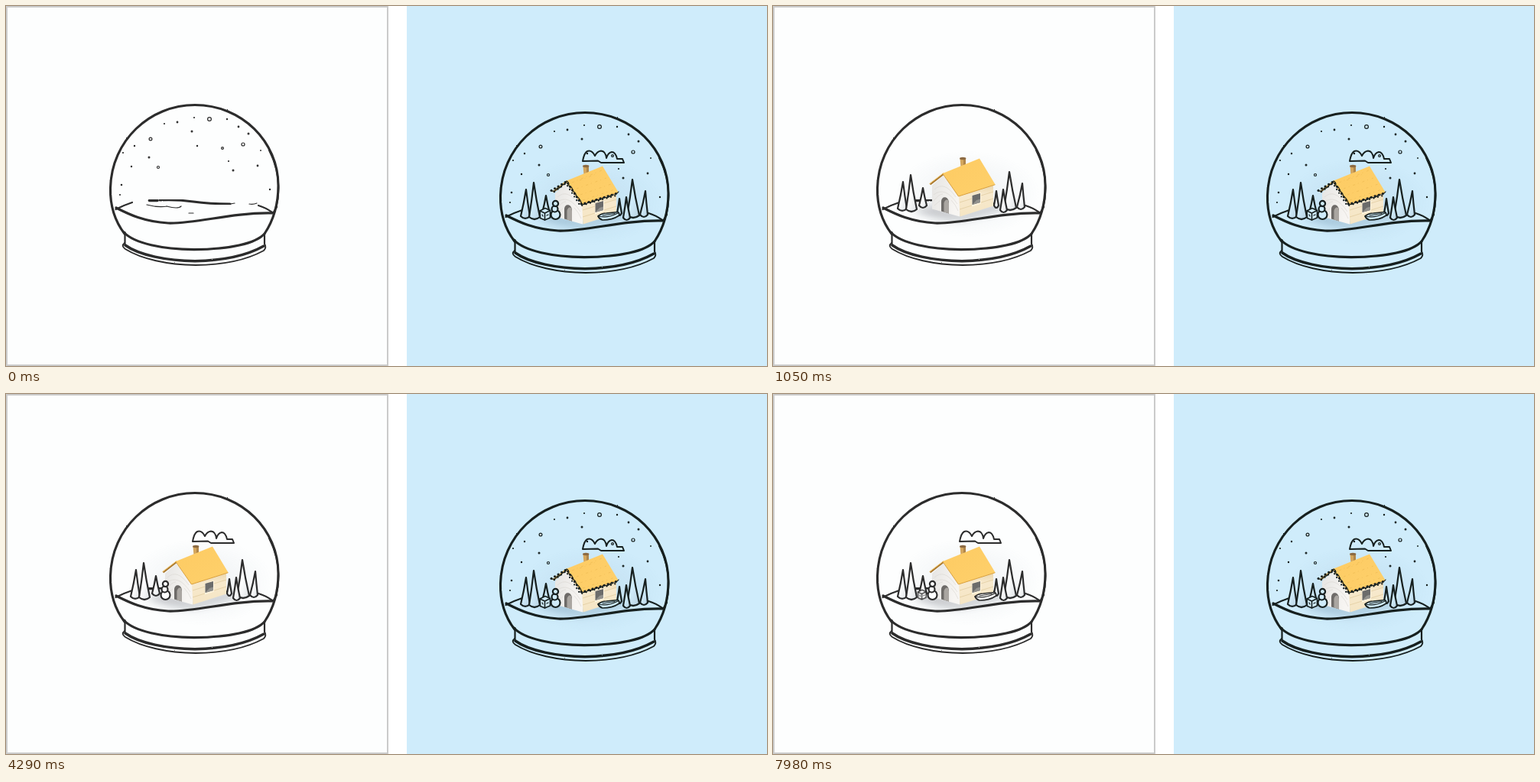
These frames come from a looping animation (995 by 471 pixels, 8 s). An HTML page:

```html
<!DOCTYPE html>
<html lang="en">
<head>
<meta charset="utf-8">
<title>Snow globe</title>
<style>
html, body { margin: 0; width: 100%; height: 100%; overflow: hidden; background: #fff; }
svg { display: block; width: 100vw; height: 100vh; }
.left { --paper: #fdfefe; --ink: #2c2c2c; --shade: #8d9096; }
.right { --paper: #cfebfa; --ink: #17201f; --shade: #7fa3bb; }
.ink { fill: none; stroke: var(--ink); stroke-width: 2.2; stroke-linecap: round; stroke-linejoin: round; }
.solid { fill: var(--paper); }
.thin { stroke-width: 1.2; }

.left use { animation: 8s infinite step-end; }
.left .home { animation-name: home; }
.left .bits { animation-name: bits; }
.left .snow { animation-name: snow; }
.left .pop { animation-timing-function: ease-out; transform-box: fill-box; transform-origin: 50% 60%; }
.left .cloud { animation-name: cloud; }
.left .man { animation-name: man; }
.left .sled { animation-name: sled; }
.left .gift { animation-name: gift; }
@keyframes home { 0% { opacity: 0 } 2.6%, 100% { opacity: 1 } }
@keyframes bits { 0% { opacity: 1 } 2.6%, 100% { opacity: 0 } }
@keyframes snow { 0% { opacity: 1 } 10.5%, 100% { opacity: 0 } }
@keyframes cloud { 0%, 23.6% { transform: scale(0) } 26%, 100% { transform: none } }
@keyframes man { 0%, 33.7% { transform: scale(0) } 36%, 100% { transform: none } }
@keyframes sled { 0%, 58.7% { transform: scale(0) } 61%, 100% { transform: none } }
@keyframes gift { 0%, 97.8% { transform: scale(0) } 99.6%, 100% { transform: scale(.8) } }
</style>
</head>
<body>
<svg viewBox="0 0 995 471" preserveAspectRatio="none">
<defs>
  <filter id="rough" x="-5%" y="-5%" width="110%" height="110%" color-interpolation-filters="sRGB">
    <feTurbulence type="fractalNoise" baseFrequency=".35" numOctaves="2" seed="4"/>
    <feDisplacementMap in="SourceGraphic" scale="1.4" xChannelSelector="R" yChannelSelector="G"/>
  </filter>
  <filter id="soft" x="-40%" y="-60%" width="180%" height="220%"><feGaussianBlur stdDeviation="5"/></filter>
  <linearGradient id="cone" x1="0" y1="0" x2="1" y2="1">
    <stop offset=".5" stop-color="#405060" stop-opacity="0"/>
    <stop offset="1" stop-color="#405060" stop-opacity=".17"/>
  </linearGradient>
  <linearGradient id="front" x1="0" y1="0" x2="1" y2=".3">
    <stop offset="0" stop-color="#e6e5e3"/><stop offset="1" stop-color="#f7f5f2"/>
  </linearGradient>
  <linearGradient id="side" x1="0" y1="0" x2="0" y2="1">
    <stop offset="0" stop-color="#ead6ac"/><stop offset=".3" stop-color="#f7e9cd"/><stop offset="1" stop-color="#f5e5c3"/>
  </linearGradient>
  <linearGradient id="roof" x1="0" y1="0" x2="1" y2="1">
    <stop offset="0" stop-color="#fdcb63"/><stop offset="1" stop-color="#fed06b"/>
  </linearGradient>
  <radialGradient id="halo">
    <stop offset=".3" stop-color="#56708c" stop-opacity=".07"/>
    <stop offset="1" stop-color="#56708c" stop-opacity="0"/>
  </radialGradient>

  <g id="globe" class="ink" filter="url(#rough)">
    <path stroke-width="3.1" style="stroke-width:3.1" d="M155 298C142 281 136 260 136.500 238C138 176 188 129.500 247 129.500C309 129.500 356 178 356 235C356 260 350 280 338 298"/>
    <path d="M344 188.500A110 110 0 0 1 353 265"/>
    <path style="stroke-width:3.2" d="M144 264C158 271 178 282 212 284C252 285 292 270 348 271"/>
    <path d="M143.500 266Q153 261 165 257M330 261Q340 264 348 270M349 271L354 263"/>
    <path style="stroke-width:3.2" d="M154 296C168 311 205 318 246 318.700C292 318 326 311 338 298"/>
    <path d="M155.500 296V313M338 298V311"/>
    <path style="stroke-width:3.5" d="M156 313C174 326 211 333.500 247 333.700C284 333 314 327 337 314"/>
    <path style="stroke-width:1.900" d="M155 310Q150 314 156 318C177 331 211 338.700 248 339C285 338.700 315 332 337 320Q341 316 338 311"/>
  </g>

  <g id="hill" class="ink" filter="url(#rough)">
    <path style="stroke-width:3.600" d="M187.500 254.500H198"/>
    <path style="stroke-width:3" d="M201 254Q224 253 245 256T293 259"/>
  </g>
  <g id="bits" class="ink thin" filter="url(#rough)">
    <path d="M184 260Q199 264 211 262M210 262Q225 266 229 262M239 271H245M293 259L299 258M318 259Q323 260 328 258"/>
  </g>

  <g id="shadow">
    <ellipse cx="255" cy="246" rx="95" ry="57" fill="url(#halo)"/>
    <path d="M183 268L212 260L244 272L292 259L304 266L247 281Q213 281 183 268" fill="var(--shade)" opacity=".42" filter="url(#soft)"/>
  </g>

  <g id="trees" filter="url(#rough)"></g>

  <g id="house">
    <path fill="url(#front)" d="M208 235L223 221L244 249V275.500L208 265.500Z"/>
    <path fill="none" stroke="#d8d5d1" stroke-width=".6" d="M211 240Q224 228 239 250M210 247Q225 235 241 259M210 255Q217 246 222 246M233 254Q239 260 242 268M211 261L218 255"/>
    <path fill="url(#side)" d="M243 248L288 234V261.500L244.500 275.500Z"/>
    <path fill="none" stroke="#dfc99b" stroke-width=".7" d="M244 257L260 252M272 248L288 243M244 266L260 261M272 257L288 252"/>
    <path fill="#6e6b68" d="M220 268.500V256C220 248 230 248 230 258V271.500Z"/>
    <path fill="#aaa6a1" d="M223.500 269.500V258Q225 252 229 254L230 258V271.500Z"/>
    <path fill="#fff5de" d="M260 247.500L272 244V258.500L260 262.500Z"/>
    <path fill="#6c6c6b" d="M260.500 248L271 245V257L260.500 260Z"/>
    <path fill="#93928e" d="M266 254L271 252.500V257L260.500 260Z"/>
    <path fill="#d4a65c" d="M244.500 199.500H252V209L245.500 211Z"/>
    <path fill="#b0864a" d="M249 200H252V209L249 210Z"/>
    <ellipse cx="248.200" cy="199.500" rx="4.200" ry="1.700" fill="#8c6a42"/>
    <path fill="none" stroke="#aa782d" stroke-width="2.200" d="M205.500 233.500L223.500 219.500"/>
    <path fill="none" stroke="#f1c368" stroke-width="1" d="M204.500 232.500L223 218.500"/>
    <path fill="url(#roof)" d="M222 219L270 199.500L290.500 233.500L242.500 249Z"/>
    <path fill="none" stroke="#d9a03c" stroke-width="1" d="M222 219.500L242.500 249L290.500 233.700"/>
  </g>

  <g id="snow" class="ink thin"></g>

  <g id="cloud" class="ink" filter="url(#rough)">
    <path style="stroke-width:2" d="M244 193Q246 182 250 180Q256 178 260 186Q263 180 268 179.500Q274 180 275 189Q277 182 282 181Q287 181 289 190L296 190L298 195H268L264 192.500Z"/>
  </g>
  <g id="man" class="ink" filter="url(#rough)">
    <circle class="solid" cx="208.500" cy="263" r="6"/>
    <circle class="solid" cx="207.500" cy="255.500" r="4"/>
    <circle class="solid" cx="208.500" cy="248.500" r="3.600"/>
  </g>
  <g id="sled" class="ink" filter="url(#rough)">
    <path class="solid" style="stroke-width:1.700" d="M264 265Q269 261 275 261L290 259.500Q293 262 291 264.500Q283 270 270 270Q266 269 264 265Z"/>
    <path class="thin" d="M265 265Q276 268 290 261M270 264L286 261.500"/>
  </g>
  <g id="gift" class="ink" filter="url(#rough)">
    <path class="solid" style="stroke-width:1.700" d="M188 258L195 254.500L201.500 257.500V267L194.500 270L188.500 267.500Z"/>
    <path style="stroke-width:1.600" d="M188 258L194.500 261L201.500 257.500M194.500 261V270"/>
    <path class="thin" d="M191 263L192 265M197 264L199 263"/>
  </g>

  <g id="lights" class="ink" filter="url(#rough)">
    <path class="thin" d="M204 232Q208 233 211 228Q215 229 217 224Q221 224 223 219Q226 220 226 225Q231 227 231 232Q235 234 236 239Q240 241 243 249Q248 251 252 246Q257 248 262 243Q267 245 272 240Q277 242 282 237Q287 238 291 233"/>
    <path style="stroke-width:3" stroke-dasharray=".1 5.200" d="M203 231.500L223 219.500L242.500 249.500L291 234.500"/>
    <path stroke-dasharray=".1 5.500" d="M207 233L222 222L241 251.500L291 237"/>
  </g>
  <g id="grain" fill="none" stroke="#e0aa42" stroke-width=".7" opacity=".55">
    <path stroke-dasharray="3 4 1 5" d="M230 221L269 205M236 229L275 215M241 237L281 223M244 244L286 230M240 218L264 209"/>
  </g>
</defs>

<rect width="995" height="471" fill="#fff"/>
<rect x="1" y="1" width="498" height="469" fill="#fdfefe" stroke="#cbcbcb" stroke-width="2"/>
<rect x="524" width="471" height="471" fill="#cfecfb"/>

<g class="left">
  <use class="home" href="#shadow"/>
  <use href="#hill"/>
  <use class="bits" href="#bits"/>
  <use href="#globe"/>
  <use class="home" href="#trees"/>
  <use class="home" href="#house"/>
  <use class="snow" href="#snow"/>
  <use class="pop cloud" href="#cloud"/>
  <use class="pop sled" href="#sled"/>
  <use class="pop gift" href="#gift"/>
  <use class="pop man" href="#man"/>
</g>
<g class="right" transform="translate(510 10)">
  <use href="#shadow"/>
  <use href="#globe"/>
  <use href="#trees"/>
  <use href="#house"/>
  <use href="#grain"/>
  <use href="#lights"/>
  <use href="#snow"/>
  <use href="#cloud"/>
  <use href="#sled"/>
  <use href="#gift"/>
  <use href="#man"/>
</g>
</svg>
<script>
// Tip x, tip y, base left, base right, base y
const trees = [
  [196, 238, 191, 201, 261], [170, 230, 163, 175, 265], [180, 221, 174, 188, 266],
  [292, 242, 289, 295, 261], [326, 232, 319, 329, 263], [309, 217, 302, 318, 264],
  [301, 240, 297, 306, 267]
];
// x, y, radius
const flakes = [
  [266, 148, 2.4], [189, 174, 1.9], [310, 181, 2], [283, 186, 1.4], [199, 211, 1.5], [297, 215, .9],
  [246, 146, .5], [289, 148, .6], [224, 152, .8], [207, 154, .5], [304, 158, .8], [317, 167, .9],
  [243, 164, .9], [168, 183, .6], [250, 183, .6], [153, 192, .5], [187, 198, .9], [164, 210, .6],
  [151, 234, .7], [291, 203, .5], [329, 209, .8], [345, 240, .6], [333, 189, .4], [149, 247, .5]
];
const cone = ([x, y, l, r, b]) => {
  const mid = (y + b) / 2, bend = side => x * .6 + side * .4;
  const d = `M${x} ${y}Q${bend(l)} ${mid} ${l} ${b}Q${(l + r) / 2} ${b + 6} ${r} ${b}Q${bend(r)} ${mid} ${x} ${y}Z`;
  return `<path class="ink solid" d="${d}"/><path fill="url(#cone)" d="${d}"/>`;
};
document.getElementById('trees').innerHTML = trees.map(cone).join('');
document.getElementById('snow').innerHTML =
  flakes.map(([x, y, r]) => `<circle cx="${x}" cy="${y}" r="${r}"/>`).join('');
</script>
</body>
</html>
```
